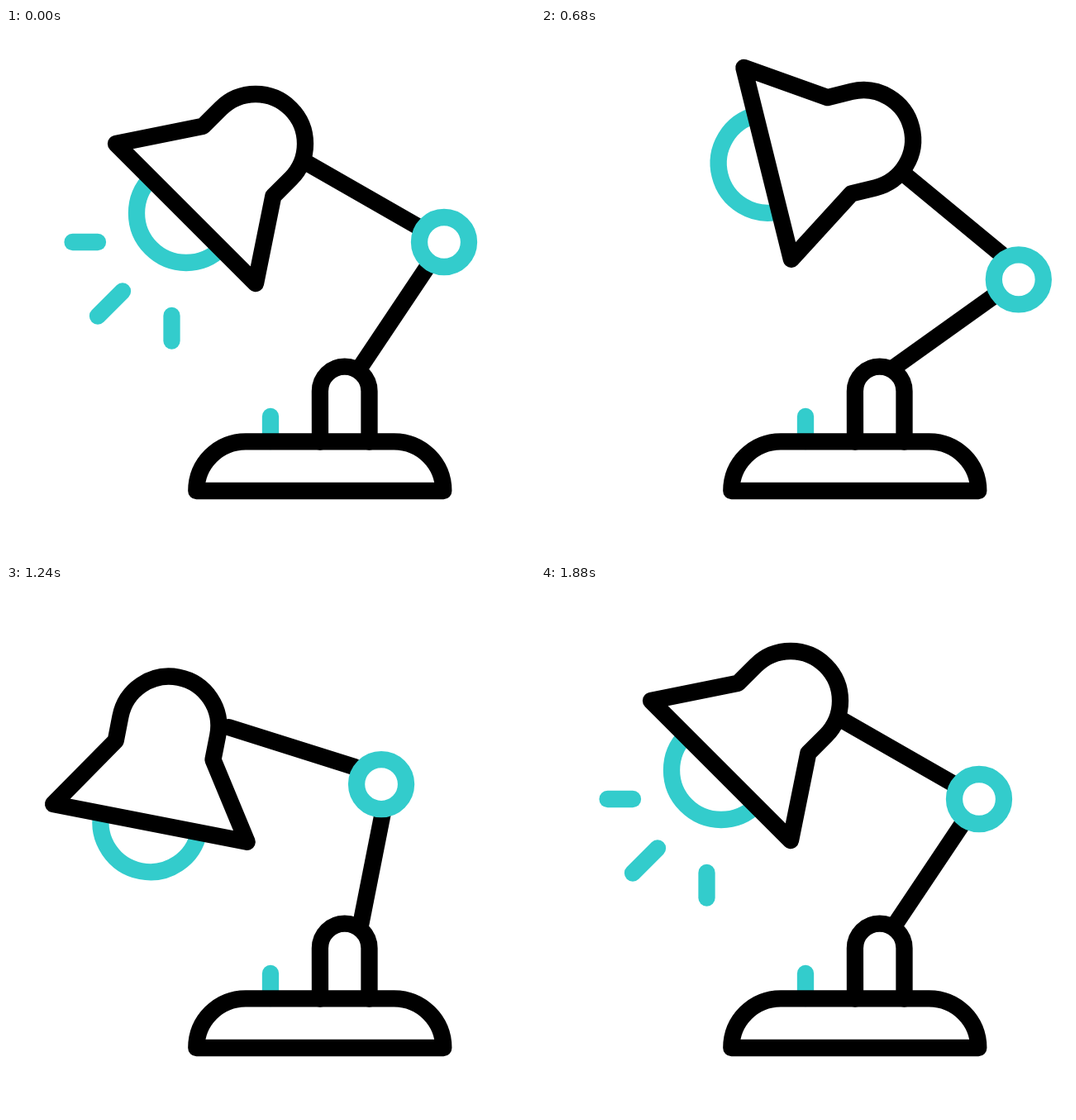
An HTML page with a canvas that plays this animation: 640 by 640 pixels, repeating every 2000 ms.

```html
<!DOCTYPE html>
<html lang="en">
<head>
<meta charset="utf-8">
<title>Desk lamp</title>
<style>
  html, body { margin: 0; width: 100%; height: 100%; overflow: hidden; background: #fff; }
  canvas { display: block; width: 640px; height: 640px; }
</style>
</head>
<body>
<canvas id="stage" width="640" height="640"></canvas>
<script>
const ctx = document.getElementById('stage').getContext('2d');
const LOOP = 2000, STEP = 40;
const INK = '#000', TEAL = '#33cccc', PAPER = '#fff';
const RAD = Math.PI / 180;

function ease(t, from, to) {
  const u = Math.min(1, Math.max(0, (t - from) / (to - from)));
  return u * u * (3 - 2 * u);
}

// Runs rest -> raised -> lowered -> rest; times holds a start and end for each move,
// bulge bends the straight way between two poses.
function track(t, times, poses, bulge = [0, 0, 0]) {
  const i = t < times[2] ? 0 : t < times[4] ? 1 : 2;
  const p = ease(t, times[2 * i], times[2 * i + 1]);
  const a = poses[i], b = poses[(i + 1) % 3];
  return a + (b - a) * p + 4 * p * (1 - p) * bulge[i];
}

const HEAD = [360, 800, 800, 1280, 1280, 1880];
const TILT = [460, 800, 800, 1280, 1320, 1880];
const ARM = [360, 800, 825, 1280, 1315, 1870];
const JOINT = [360, 800, 830, 1280, 1360, 1800];

function stroke(color, path, fill) {
  ctx.beginPath();
  path();
  if (fill) {
    ctx.fillStyle = PAPER;
    ctx.fill();
  }
  ctx.strokeStyle = color;
  ctx.stroke();
}

function line(color, x1, y1, x2, y2, cap = 'round') {
  ctx.lineCap = cap;
  stroke(color, () => {
    ctx.moveTo(x1, y1);
    ctx.lineTo(x2, y2);
  });
}

function ring(x, y, r) {
  stroke(TEAL, () => ctx.arc(x, y, r, 0, 2 * Math.PI), true);
}

function placed(x, y, angle, draw) {
  ctx.save();
  ctx.translate(x, y);
  ctx.rotate(angle * RAD);
  draw();
  ctx.restore();
}

function drawRays(t) {
  const size = t < 1000 ? 1 - ease(t, 40, 400) : ease(t, 1480, 1880);
  if (size <= 0) return;
  const turn = t < 1000 ? 0 : -31.4 * (1 - ease(t, 1480, 1720));
  placed(274, 319, turn, () => {
    const ray = (x, y, dx, dy) => line(TEAL, x, y, x + dx * size, y + dy * size);
    ray(-193.5, -60, 30.5, 0);
    ray(-163, 29.5, 30, -30);
    ray(-73.5, 59.5, 0, -30.5);
  });
}

function drawHead(t) {
  const x = track(t, HEAD, [302, 409.7, 193], [0, 0.7, 0]);
  const y = track(t, HEAD, [140, 134, 171.7], [0, -4.3, 0.6]);
  const tilt = track(t, TILT, [0, 43.5, -35.5]);
  placed(x, y, tilt, () => {
    ring(-84, 84, 60);
    stroke(INK, () => {
      ctx.moveTo(-169, 0);
      ctx.lineTo(-63.5, -21.3);
      ctx.arc(0, 0, 60, -135 * RAD, 45 * RAD);
      ctx.lineTo(21.3, 63.5);
      ctx.lineTo(0, 169);
      ctx.closePath();
    }, true);
  });
}

function drawArms(t) {
  const low = track(t, ARM, [-56.2, -31, -80], [0, 1.4, -0.4]);
  placed(429.5, 409, low, () => line(INK, -4, 0, 150, 0, 'butt'));

  const x = track(t, ARM, [364.5, 448.3, 265.5]);
  const y = track(t, ARM, [163.5, 173.3, 172], [0, 1.6, -1.5]);
  const high = track(t, ARM, [29.8, 41.7, 16.9], [0, 0.4, -0.2]);
  placed(x, y, high, () => line(INK, 0, 0, 160, 0));
}

function drawJoint(t) {
  const x = track(t, JOINT, [530, 588.5, 451]);
  const y = track(t, JOINT, [259, 314.5, 239], [0, 4, -5]);
  ring(x, y, 30);
}

function drawBase() {
  line(TEAL, 320, 470, 320, 500);
  ctx.lineCap = 'round';
  stroke(INK, () => {
    ctx.moveTo(380, 500.5);
    ctx.arc(409.7, 439.5, 29.8, Math.PI, 0);
    ctx.lineTo(439.5, 500.5);
  }, true);
  stroke(INK, () => {
    ctx.moveTo(230.5, 560);
    ctx.arc(290, 560, 59.7, Math.PI, 1.5 * Math.PI);
    ctx.arc(469.6, 560, 59.7, 1.5 * Math.PI, 0);
    ctx.closePath();
  });
}

function draw(t) {
  ctx.fillStyle = PAPER;
  ctx.fillRect(0, 0, 640, 640);
  ctx.lineWidth = 20.3;
  ctx.lineJoin = 'round';
  drawRays(t);
  drawArms(t);
  drawJoint(t);
  drawHead(t);
  drawBase();
}

let start;
function tick(now) {
  if (start === undefined) start = now;
  const t = Math.max(0, now - start) % LOOP;
  draw(Math.floor(t / STEP) * STEP);
  requestAnimationFrame(tick);
}
draw(0);
requestAnimationFrame(tick);
</script>
</body>
</html>
```
